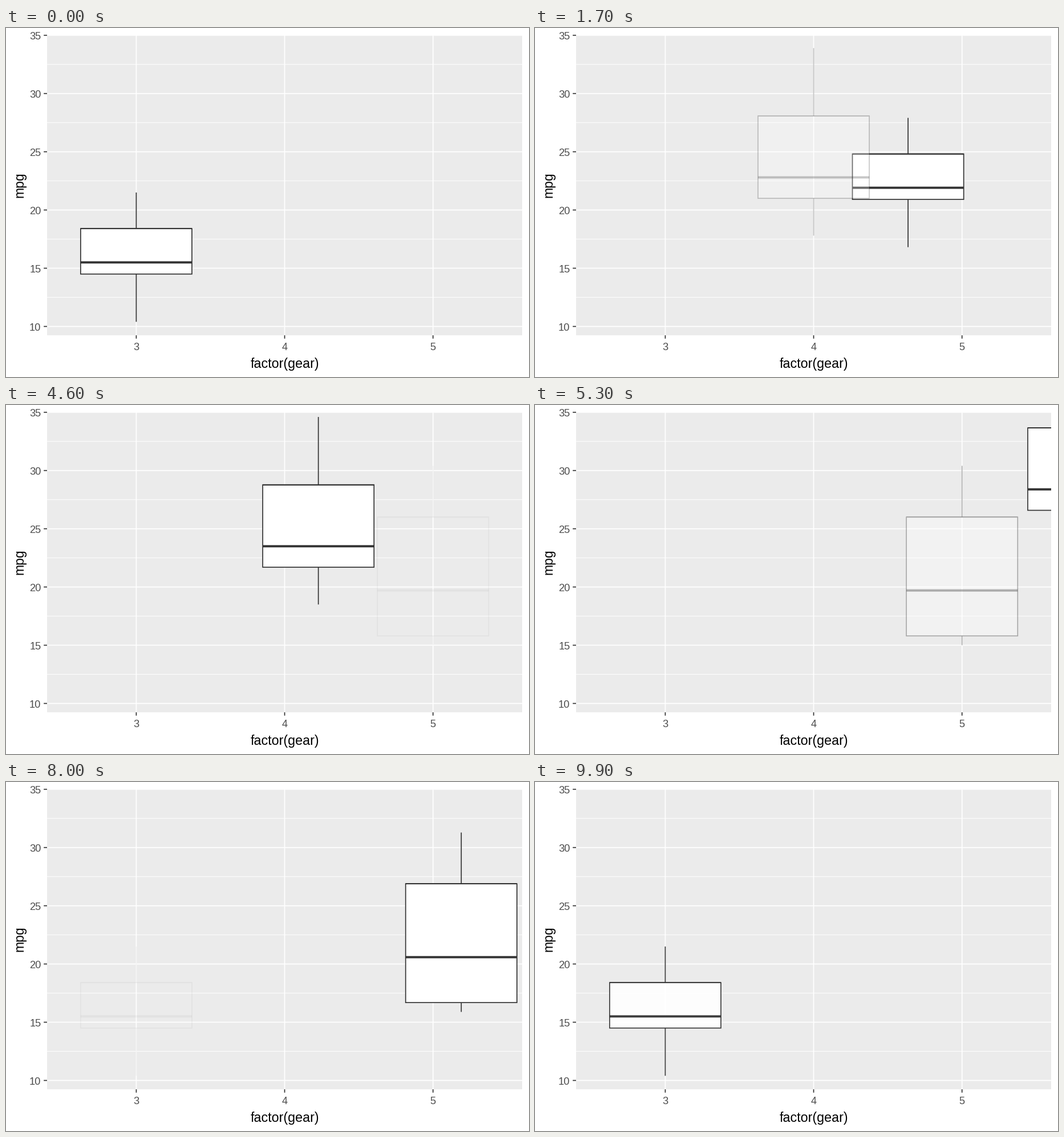
A matplotlib script that plays this animation: 917x611 px, repeating every 10000 ms.

```python
import matplotlib.pyplot as plt
from matplotlib.animation import FuncAnimation
from matplotlib.patches import Rectangle

W, H, DPI = 917, 611, 100
FRAMES, INTERVAL = 100, 100
PX = 72 / DPI  # points per pixel
LEFT, RIGHT, TOP, BOTTOM = 72, 905.4, 11.5, 538
INK = "#333333"
LINE, MEDIAN = 1.7, 3.9
HALF_BOX = 0.375
FLY_TO = (7, 40)

# five-number summary and the height each box flies from
BOXES = [
    dict(x=1, stats=(10.4, 14.5, 15.5, 18.4, 21.5), anchor=16.5),
    dict(x=2, stats=(17.8, 21.0, 22.8, 28.075, 33.9), anchor=24.65),
    dict(x=3, stats=(15.0, 15.8, 19.7, 26.0, 30.4), anchor=21.4),
]
# (last still frame, number of steps, leaving box, entering box)
TRANSITIONS = [(11, 22, 0, 1), (45, 22, 1, 2), (79, 21, 2, 0)]

plt.rcParams["font.family"] = "Liberation Sans"
fig = plt.figure(figsize=(W / DPI, H / DPI), dpi=DPI, facecolor="white")
ax = fig.add_axes([0, 0, 1, 1])
ax.set(xlim=(0, W), ylim=(H, 0))
ax.axis("off")


def px(x):
    return 228.4 + (x - 1) * 260.15


def py(y):
    return 522.5 - (y - 10) * 20.39


def line(xs, ys, color, width, z):
    return ax.plot(xs, ys, color=color, lw=width * PX, zorder=z,
                   solid_capstyle="butt", snap=False)[0]


def label(x, y, text, size, color, **kw):
    ax.text(x, y, text, fontsize=size * PX, color=color, va="baseline", **kw)


def draw_background():
    ax.add_patch(Rectangle((LEFT, TOP), RIGHT - LEFT, BOTTOM - TOP,
                           fc="#EBEBEB", lw=0, zorder=0))
    for y in (12.5, 17.5, 22.5, 27.5, 32.5):
        line([LEFT, RIGHT], [py(y)] * 2, "white", 1, 1)
    for y in range(10, 36, 5):
        line([LEFT, RIGHT], [py(y)] * 2, "white", LINE, 1)
        line([LEFT - 5.8, LEFT], [py(y)] * 2, INK, LINE, 1)
        label(61.5, py(y) + 7.6, str(y), 18.3, "#4D4D4D", ha="right")
    for x, gear in enumerate("345", 1):
        line([px(x)] * 2, [TOP, BOTTOM], "white", LINE, 1)
        line([px(x)] * 2, [BOTTOM, BOTTOM + 5.8], INK, LINE, 1)
        label(px(x), 563.8, gear, 18.3, "#4D4D4D", ha="center")
    label(488.5, 595, "factor(gear)", 23.3, "black", ha="center")
    ax.text(30, 274.5, "mpg", fontsize=23 * PX, color="black", rotation=90,
            rotation_mode="anchor", ha="center", va="baseline")


class BoxArtist:
    def __init__(self, z):
        self.fill = ax.add_patch(Rectangle((0, 0), 1, 1, fc="white", lw=0,
                                           zorder=z))
        self.whiskers = [line([], [], INK, LINE, z + 0.1) for _ in range(2)]
        self.edge = line([], [], INK, LINE, z + 0.2)
        self.edge.set_solid_joinstyle("miter")
        self.median = line([], [], INK, MEDIAN, z + 0.3)
        self.parts = [self.fill, *self.whiskers, self.edge, self.median]
        clip = Rectangle((LEFT, TOP), RIGHT - LEFT, BOTTOM - TOP,
                         transform=ax.transData)
        for part in self.parts:
            part.set_clip_path(clip)

    def show(self, box, fly=0.0, alpha=1.0):
        x = box["x"] + (FLY_TO[0] - box["x"]) * fly
        lift = (FLY_TO[1] - box["anchor"]) * fly
        low, q1, mid, q3, high = (py(s + lift) for s in box["stats"])
        x0, xc, x1 = px(x - HALF_BOX), px(x), px(x + HALF_BOX)
        self.fill.set_bounds(x0, q3, x1 - x0, q1 - q3)
        self.whiskers[0].set_data([xc, xc], [high, q3])
        self.whiskers[1].set_data([xc, xc], [q1, low])
        self.edge.set_data([x0, x1, x1, x0, x0, x1], [q3, q3, q1, q1, q3, q3])
        self.median.set_data([x0, x1], [mid, mid])
        for part in self.parts:
            part.set_alpha(alpha)
            part.set_visible(alpha > 0)

    def hide(self):
        for part in self.parts:
            part.set_visible(False)


draw_background()
leaving, entering = BoxArtist(3), BoxArtist(4)


def update(frame):
    leaving.hide()
    current = 0
    for start, steps, old, new in TRANSITIONS:
        t = (frame - start) / steps
        if 0 < t < 1:
            leaving.show(BOXES[old], fly=t)
            entering.show(BOXES[new], alpha=t)
            return leaving.parts + entering.parts
        if t >= 1:
            current = new
    entering.show(BOXES[current])
    return leaving.parts + entering.parts


anim = FuncAnimation(fig, update, frames=FRAMES, interval=INTERVAL,
                     init_func=lambda: update(0), repeat=True, repeat_delay=0)
plt.show()
```
